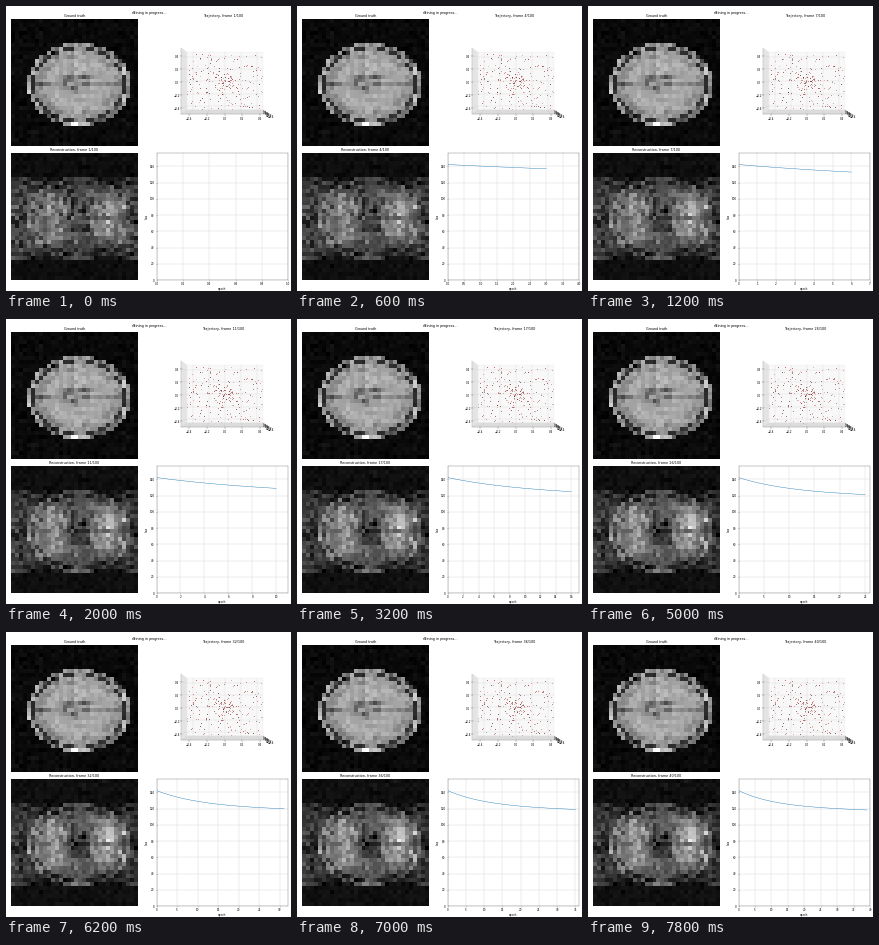
A matplotlib script that plays this animation: 285x285 px, repeating every 8 s.

```python
import numpy as np
import matplotlib.pyplot as plt
from matplotlib.animation import FuncAnimation

SIZE, DPI = 285, 20
FRAMES, INTERVAL, TOTAL = 40, 200, 100
N = 32
TICKS = [-0.4, -0.2, 0.0, 0.2, 0.4]

rng = np.random.default_rng(7)
fig = plt.figure(figsize=(SIZE / DPI, SIZE / DPI), dpi=DPI, facecolor="white")


def pixel_axes(x, y, w, h):
    return fig.add_axes([x / SIZE, 1 - (y + h) / SIZE, w / SIZE, h / SIZE])


def put_text(x, y, text, ha):
    return fig.text(x / SIZE, 1 - y / SIZE, text, fontsize=12,
                    ha=ha, va="baseline")


# --- brain slice -----------------------------------------------------------
v, u = np.mgrid[0:N, 0:N].astype(float)
radius = np.hypot((u - 16.6) / 12.5, (v - 16) / 10.1)


def spot(cu, cv, su, sv):
    return np.exp(-((u - cu) / su) ** 2 - ((v - cv) / sv) ** 2)


def make_brain():
    img = 0.04 + 0.02 * rng.normal(size=(N, N))
    img += (radius < 0.95) * 0.14
    inside = radius < 0.9
    tissue = 0.66 + 0.035 * rng.normal(size=(N, N))
    tissue -= 0.16 * (radius > 0.7) * rng.random((N, N))
    for cu, cv, su, sv, depth in [
        (14.3, 14.4, 1.7, 0.7, 0.42), (18, 14, 1.6, 0.6, 0.36),
        (15.2, 17.2, 1.3, 0.7, 0.38), (18.6, 16.2, 1.5, 0.6, 0.3),
        (12.8, 15.8, 0.8, 1, 0.25), (7.6, 16, 3, 0.6, 0.25),
        (24.5, 16, 3, 0.6, 0.2),
    ]:
        tissue -= depth * spot(cu, cv, su, sv)
    img[inside] = tissue[inside]
    ring = np.abs(radius - 1) < 0.045
    shade = 0.22 + 0.45 * rng.random((N, N))
    shade += 0.5 * spot(15.5, 26, 2.8, 1) + 0.25 * spot(15.5, 6, 4, 1)
    shade += 0.2 * (np.abs(u - 16.6) > 10.5)
    img[ring] = shade[ring]
    return np.clip(img, 0, 1)


def make_recons(brain):
    ghost = np.roll(brain, 16, axis=1)
    env = np.sqrt(np.clip(1 - ((v - 16) / 10.8) ** 2, 0, 1))
    floor = 0.03 + 0.015 * rng.normal(size=(N, N))
    coarse, fine = rng.normal(size=(2, N, N))
    lobes = spot(24, 13, 1.7, 3.5) + 0.5 * spot(9.5, 11, 2.2, 3)
    lobes += 0.45 * spot(10.5, 18, 2.3, 3) + 0.35 * spot(23, 19, 2, 2.5)
    rough = floor + 0.3 * brain + 0.27 * ghost
    rough += env * (0.07 + 0.1 * coarse + 0.22 * lobes)
    clear = floor + 0.5 * brain + 0.27 * ghost
    clear += env * (0.06 * coarse + 0.05 * fine + 0.3 * lobes)
    clear -= 0.22 * spot(16.5, 16.3, 2.5, 2)
    return rough, clear


brain = make_brain()
rough, clear = make_recons(brain)


def picture(x, y, data, title):
    ax = pixel_axes(x, y, 127, 127)
    ax.axis("off")
    shown = ax.imshow(data, cmap="gray", vmin=0, vmax=1,
                      interpolation="nearest", aspect="auto")
    return shown, ax.set_title(title)


picture(5, 13, brain, "Ground truth")
recon, recon_title = picture(5, 147, rough, "")

# The capital T is kerned tightly onto the next letter.
put_text(127, 8.3, "T", "left")
put_text(143.5, 8.3, "raining in progress...", "center")
box_cap = put_text(198.3, 11.3, "T", "left")
box_title = put_text(218, 11.3, "", "center")

# --- trajectory box, seen straight from the front --------------------------
box = pixel_axes(151, 13, 131, 127)
box.set(xlim=(151, 282), ylim=(140, 13))
box.axis("off")


def px(x):
    return 218.5 + 88 * x


def pz(z):
    return 75.8 - 65 * z


def pane(corners, shade):
    box.add_patch(plt.Polygon(corners, fc=shade, ec="#e4e4e4", lw=0.8))


def thin(x0, y0, x1, y1, color="#c4c4c4"):
    box.plot([x0, x1], [y0, y1], color=color, lw=0.8)


pane([(181, 46), (257, 46), (257, 104), (181, 104)], "#f8f8f8")
pane([(175, 42), (181, 46), (181, 104), (175, 108)], "#eeeeee")
pane([(175, 108), (181, 104), (257, 104), (264, 108)], "#e4e4e4")

for t in TICKS:
    bx, bz = 219 + 80 * t, 75.3 - 62 * t
    thin(bx, 46, bx, 104)
    thin(181, bz, 257, bz)
    thin(bx, 104, px(t), 108)
    thin(181, bz, 175, pz(t))
    depth = 0.5 - t
    left, low = 181 - 6 * depth, 104 + 4 * depth
    thin(left, low, 257 + 7 * depth, low)
    thin(left, 46 - 4 * depth, left, low)
    thin(174, pz(t), 176, pz(t), "black")
    thin(px(t), 107.5, px(t), 109.5, "black")
    label = f"{t:.1f}".replace("-", "\u2212")
    style = dict(fontsize=10, ha="center", va="center")
    box.text(px(t), 113, label, **style)
    box.text(171, pz(t) + 1, label, **style)
    box.text(262 - 7 * t, 109 - 5 * t, label, **style)
thin(175, 42, 175, 108, "#606060")
thin(175, 108, 264, 108, "#606060")
thin(257, 104, 265, 110, "black")

COUNT = 240
spread = rng.uniform(-0.43, 0.43, (COUNT, 2))
core = rng.normal(0, 0.07, (COUNT, 2))
start = np.where(rng.random((COUNT, 1)) < 0.25, core, spread)
drift = rng.normal(0, 0.006, (COUNT, 2))
tint = np.zeros((COUNT, 4))
tint[:, 0] = rng.choice([0.75, 0.6, 0.3], COUNT)
tint[:, 1:3] = 0.15
tint[:, 3] = rng.uniform(0.25, 0.75, COUNT)
dots = box.scatter(px(start[:, 0]), pz(start[:, 1]), s=12, marker="s",
                   c=tint, linewidths=0)

# --- loss curve ------------------------------------------------------------
epochs = np.arange(FRAMES)
loss = 142.2 - 20.2 * (1 - np.exp(-epochs / 10.8)) - 0.11 * epochs
chart = pixel_axes(150.55, 147, 131.6, 127)
curve, = chart.plot([], [], lw=1.5)
chart.set(xlabel="epoch", ylabel="loss", ylim=(0, 1.1 * loss[0]))
chart.grid(True)


def update(i):
    step = f"frame {i + 1}/{TOTAL}"
    gain = 1 - np.exp(-i / 9)
    recon.set_data(np.clip(rough + (clear - rough) * gain, 0, 1))
    recon_title.set_text("Reconstruction, " + step)
    box_title.set_text("rajectory, " + step)
    box_cap.set_x((198.3 - (i >= 9)) / SIZE)
    # whole pixels keep the dots crisp
    pts = start + drift * gain
    xs = np.floor(px(pts[:, 0])) + 0.5
    ys = np.floor(pz(pts[:, 1])) + 0.5
    dots.set_offsets(np.column_stack([xs, ys]))
    curve.set_data(epochs[:i + 1], loss[:i + 1])
    chart.set_xlim(0, i + 1)
    return recon, recon_title, box_cap, box_title, dots, curve


anim = FuncAnimation(fig, update, frames=FRAMES, interval=INTERVAL,
                     init_func=lambda: update(0), repeat=True, repeat_delay=0)
plt.show()
```
